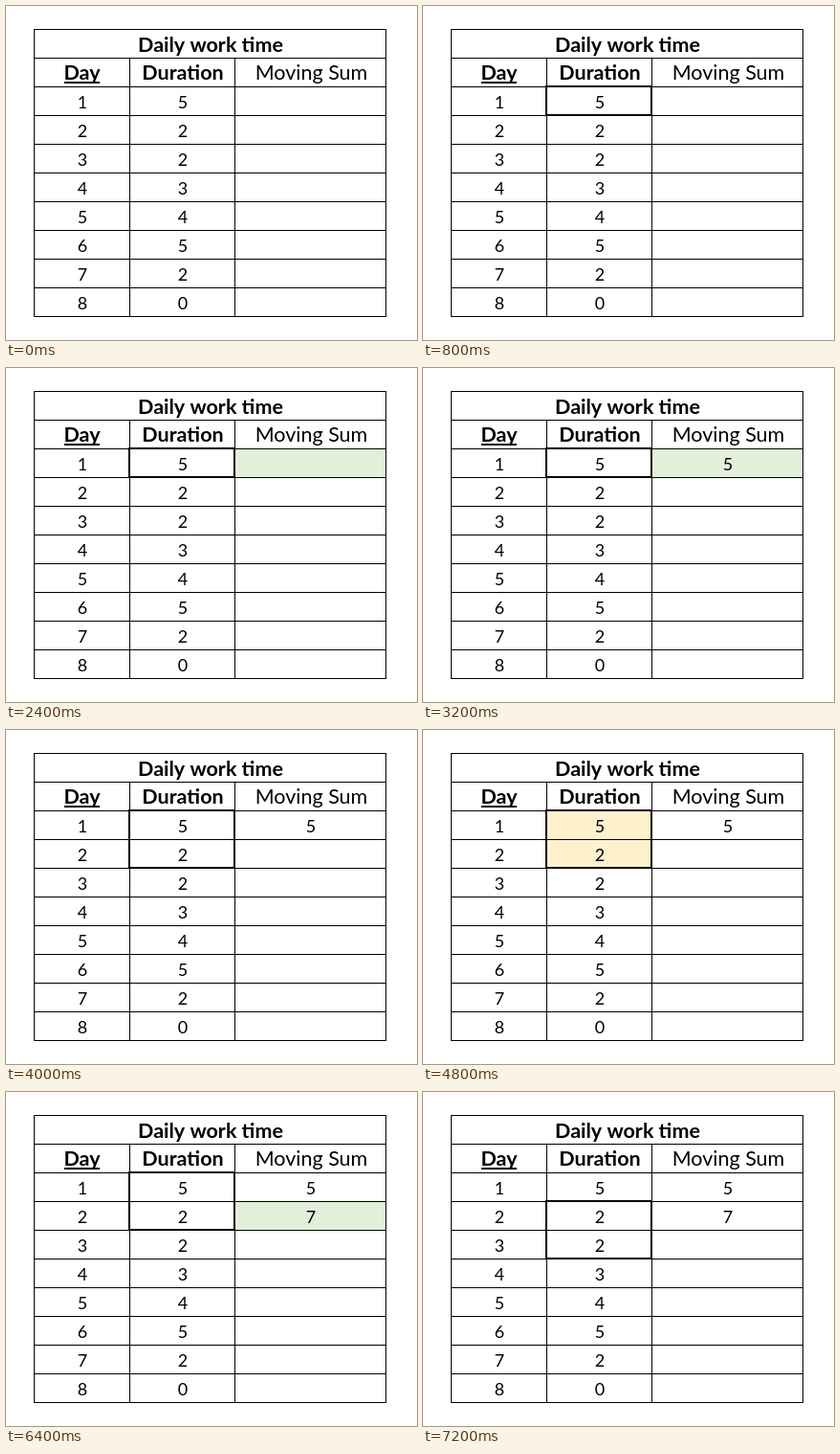
These frames come from a looping animation (430x349 px, 8 s). An HTML page with a canvas:

```html
<!DOCTYPE html>
<html lang="en">
<head>
<meta charset="utf-8">
<title>Moving sum</title>
<style>
  html, body { margin: 0; width: 100%; height: 100%; overflow: hidden; background: #fff; }
  canvas { display: block; }
</style>
</head>
<body>
<canvas id="stage" width="430" height="349"></canvas>
<script>
const ctx = document.getElementById('stage').getContext('2d');
const STEP = 800, STEPS = 10, ROW = 30, TOP = 84;
const LEFT = 29, RIGHT = 397, COL1 = 129, COL2 = 239;
const DAY_X = 80, DURATION_X = 185, SUM_X = 319;
const durations = [5, 2, 2, 3, 4, 5, 2, 0];
const sums = [5, 7];
const rowY = row => TOP + row * ROW;

function rect(x, y, w, h, color = '#000') {
  ctx.fillStyle = color;
  ctx.fillRect(x, y, w, h);
}

function text(value, x, baseline, size = 18, weight = 400) {
  ctx.font = `${weight} ${size}px Lato, sans-serif`;
  ctx.textAlign = 'center';
  ctx.fillStyle = '#000';
  ctx.fillText(value, x, baseline);
}

function drawGrid() {
  for (let y = 24; y <= 324; y += ROW) rect(LEFT, y, RIGHT - LEFT + 1, 1);
  for (const x of [LEFT, RIGHT]) rect(x, 24, 1, 301);
  for (const x of [COL1, COL2]) rect(x, 54, 1, 271);
}

function drawLabels() {
  text('Daily work time', 214, 48, 21.5, 700);
  text('Day', 79.5, 77, 21.5, 700);
  rect(61, 79, 37, 2);
  text('Duration', DURATION_X, 77, 21.5, 700);
  text('Moving Sum', 319.5, 77, 21.5);
  durations.forEach((value, i) => {
    text(i + 1, DAY_X, rowY(i) + 23);
    text(value, DURATION_X, rowY(i) + 23);
  });
}

// Each window takes four steps: outline, shade inputs, shade result, write sum.
function draw(step) {
  const pass = Math.floor((step - 1) / 4);
  const phase = (step - 1) % 4;
  const first = Math.max(0, pass - 1);
  const count = pass === 0 ? 1 : 2;

  rect(0, 0, 430, 349, '#fff');
  if (step > 0) {
    if (phase === 1) rect(COL1, rowY(first), COL2 - COL1, count * ROW, '#fff0ce');
    if (phase >= 2) rect(COL2, rowY(pass), RIGHT - COL2, ROW, '#e2efda');
  }
  drawGrid();
  drawLabels();
  if (step > 0) {
    ctx.lineWidth = 2;
    ctx.strokeStyle = '#000';
    ctx.strokeRect(COL1, rowY(first), COL2 - COL1, count * ROW);
  }
  sums.forEach((sum, i) => {
    if (step >= 4 * (i + 1)) text(sum, SUM_X, rowY(i) + 23);
  });
}

function tick() {
  draw(Math.floor(performance.now() / STEP) % STEPS);
  requestAnimationFrame(tick);
}
tick();
</script>
</body>
</html>
```
